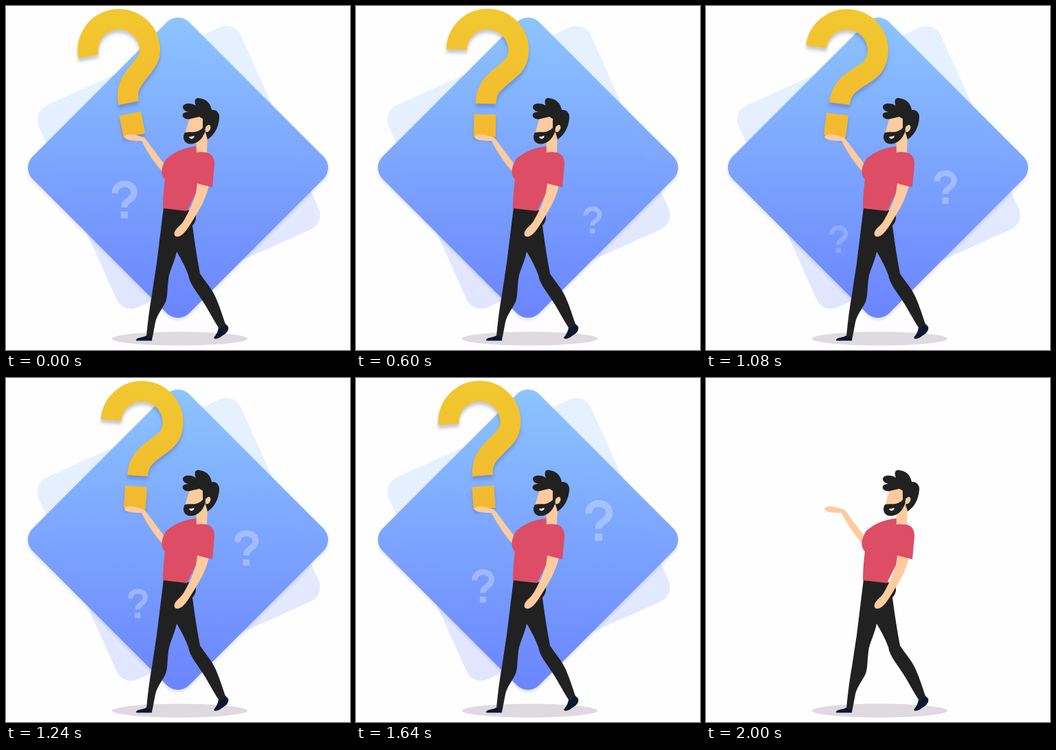
These frames come from a looping animation (500x500 px, 2040 ms). An HTML page:

```html
<!DOCTYPE html>
<html lang="en">
<head>
<meta charset="utf-8">
<title>Man holding a question mark</title>
<style>
html, body { margin: 0; width: 100%; height: 100%; overflow: hidden; background: #fefefe; }
svg { display: block; width: 100vw; height: 100vh; }
.lift { filter: drop-shadow(0 3px 2px rgba(50, 50, 90, .16)); }
.cast { filter: drop-shadow(0 5px 2px rgba(60, 60, 120, .28)); }
.skin { fill: #fdcb9e; }
.dark { fill: #212121; }
.shoe { fill: #0b1930; }
</style>
</head>
<body>
<svg viewBox="0 0 500 500">
  <defs>
    <linearGradient id="blue" x1="0" y1="0" x2="1" y2="1">
      <stop offset="0" stop-color="#8ac4ff"/>
      <stop offset="1" stop-color="#667fff"/>
    </linearGradient>
    <linearGradient id="pale" x1=".3" y1="0" x2="0" y2="1">
      <stop offset="0" stop-color="#e6f1ff"/>
      <stop offset="1" stop-color="#e1e5ff"/>
    </linearGradient>
    <linearGradient id="gold" gradientUnits="userSpaceOnUse" x1="0" y1="4" x2="0" y2="190">
      <stop offset="0" stop-color="#f1c82f"/>
      <stop offset="1" stop-color="#f3b92f"/>
    </linearGradient>
    <rect id="tile" x="-161" y="-161" width="322" height="322" rx="23"/>
    <g id="mark">
      <path d="M-15-10C-15-20-8-24.500 0-24.500S15-19.500 15-11C15-4 9-1 4.500 3S-.5 8-.5 12.500" fill="none" stroke="#fff" stroke-width="10"/>
      <path d="M-6 19h11v10.500h-11z" fill="#fff"/>
    </g>
  </defs>

  <g id="scene">
    <use href="#tile" fill="url(#pale)" transform="translate(251 234.500) rotate(-24.200)"/>
    <g class="lift">
      <use href="#tile" fill="url(#blue)" fill-opacity=".96" transform="translate(250 235) rotate(45)"/>
    </g>
    <use id="left" href="#mark"/>
    <use id="right" href="#mark"/>
    <g class="cast">
      <g id="big">
        <path d="M144.500 64A45 45 0 0 1 234.500 64C234.500 83 225 89 212 100S188 120 188 142" fill="none" stroke="url(#gold)" stroke-width="30"/>
        <path d="M171 157.500h32v32.500h-32z" fill="url(#gold)"/>
      </g>
    </g>
  </g>

  <g id="man">
    <ellipse cx="252.500" cy="483.500" rx="98.500" ry="10" fill="#dfd9e0"/>
    <path class="shoe" d="M189 485C192 481 199 482 204 479H213L212 486.500H191Q189 487 189 485Z"/>
    <path class="shoe" d="M302 482Q308 475 309 467L318 461L323 466C325 474 316 478 312 481C308 484 303 485 302 482Z"/>
    <path class="dark" d="M229 293L276 298V309Q275 315 271 319Q276 358 282 389C289 400 299 410 305 424S315 451 319 463L310 469C303 459 295 443 286 429S267 404 265 391Q259 375 248 357C246 370 237 386 236 398C234 415 235 424 231 432S219 450 217 460L213 481H204Q207 448 212 420L219 374Z"/>
    <path class="skin" d="M172 190C174 186 181 186 186 187L201 191L231 231L229 243Q210 222 197 196C189 196 173 196 172 190Z"/>
    <path class="skin" d="M276 256L295 260C291 280 282 294 273 309S258 333 251 335S243 330 247 325S256 317 259 311Q270 292 276 272Z"/>
    <path d="M277 204L278 212L292 213Q303 216 303 230L300 263.500L278 258L276 272L263 298L228 294Q228 275 231 252C223 244 227 232 233 222Q252 206 277 204Z" fill="#dd4d66"/>
    <path class="skin" d="M276 184H293L292 213Q284 211 277 213Z"/>
    <path class="skin" d="M267 162L288 157L290 180L277 194L260 186Z"/>
    <path class="dark" d="M257 147C257 141 269 140 276 145C273 138 275 133 281 134Q296 136 299 151C306 150 311 156 310 163Q308 184 293 194L290 184L294 174L286 177V164L281 161L268 164C262 166 255 162 257 157Q259 154 265 154Q257 152 257 147Z"/>
    <path class="dark" d="M260 184C268 182 278 186 286 177L287 171L291 177C288 190 281 200 268 200.500C258 200 256 190 260 184Z"/>
    <path d="M266 190Q270 190 274 188.500Q273 193 269 193Q267 193 266 190Z" fill="#fff"/>
    <ellipse class="skin" cx="293.500" cy="178" rx="3.500" ry="5.500" transform="rotate(25 293.500 178)"/>
  </g>
</svg>
<script>
const LOOP = 2040, STEP = 40, BLANK = 2000, TURN = 990;
const LOW = -11.5, HIGH = 8.8;

// Rising marks: p runs from 0 to 1 over each life.
const floaters = [
  { id: 'left', start: 960, life: 1560,
    x: p => 193 - 43 * p * p, y: p => 348 - 120 * p + 34 * p * p, size: p => 38 + 24 * p },
  { id: 'right', start: 160, life: 1680,
    x: p => 340 + 15 * p, y: p => 355 - 168 * p, size: p => 31 + 32 * p }
];

const byId = id => document.getElementById(id);
const scene = byId('scene'), big = byId('big');

function float({ id, start, life, x, y, size }, t) {
  const p = ((t - start + LOOP) % LOOP) / life;
  const fade = Math.max(0, Math.min(1, p * 9, (1 - p) * 9));
  const el = byId(id);
  el.setAttribute('opacity', .29 * fade);
  el.setAttribute('transform', `translate(${x(p)} ${y(p)}) scale(${size(p) / 59})`);
}

function draw(now) {
  const t = Math.floor((now % LOOP) / STEP) * STEP;
  const swing = 1 - Math.abs(t - TURN) / TURN;
  const angle = LOW + (HIGH - LOW) * swing;
  const rise = 90 * (1 - Math.cos(angle * Math.PI / 180));
  scene.setAttribute('visibility', t < BLANK ? 'visible' : 'hidden');
  big.setAttribute('transform', `translate(0 ${-rise}) rotate(${angle} 187 191)`);
  floaters.forEach(f => float(f, t));
}

const start = performance.now();
function tick() {
  draw(performance.now() - start);
  requestAnimationFrame(tick);
}
tick();
</script>
</body>
</html>
```
